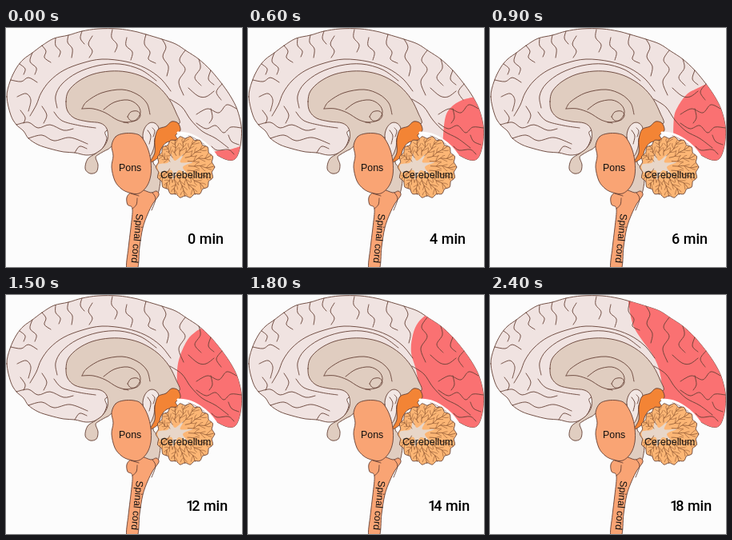
An HTML page for the animation above (2.7 s loop, 295 px wide and 299 px high).

```html
<!DOCTYPE html>
<html lang="en">
<head>
<meta charset="utf-8">
<title>Spreading wave across the cortex</title>
<style>
html, body { margin: 0; width: 100%; height: 100%; overflow: hidden; background: #fcfcfc; }
svg { display: block; width: 295px; height: 299px; }
path { stroke-linecap: round; stroke-linejoin: round; }
text { font: 12.4px "Liberation Sans", Arial, sans-serif; fill: #111; }
#time { font: 500 18px Roboto, sans-serif; fill: #000; }
</style>
</head>
<body>
<svg viewBox="0 0 295 299">
  <defs><clipPath id="clip"></clipPath></defs>
  <g id="base"></g>
  <path id="wave" fill="#fa7172" clip-path="url(#clip)"/>
  <g id="lines"></g>
  <text x="141" y="179">Pons</text>
  <text x="193" y="188">Cerebellum</text>
  <text transform="translate(163 232) rotate(96)">Spinal cord</text>
  <text id="time" y="270"><tspan id="tens"></tspan><tspan id="rest"></tspan></text>
</svg>
<script>
const $ = id => document.getElementById(id);
const INK = '#654035', TAN = '#e0cdc0', ORANGE = '#f9a474';

// Smooth curve through "x,y x,y ..." points
function smooth(text, closed) {
  const p = text.trim().split(/\s+/).map(s => s.split(',').map(Number)), n = p.length;
  const at = i => closed ? p[(i + n) % n] : p[Math.max(0, Math.min(n - 1, i))];
  let d = 'M' + p[0];
  for (let i = 0; i < (closed ? n : n - 1); i++) {
    const [a, b, c, e] = [at(i - 1), at(i), at(i + 1), at(i + 2)];
    const h = k => b[k] + (c[k] - a[k]) / 6, g = k => c[k] - (e[k] - b[k]) / 6;
    d += `C${h(0)},${h(1)} ${g(0)},${g(1)} ${c}`;
  }
  return d + (closed ? 'Z' : '');
}

function add(parent, d, fill = 'none', stroke = INK, width = 0.9) {
  const el = document.createElementNS('http://www.w3.org/2000/svg', 'path');
  Object.entries({ d, fill, stroke, 'stroke-width': width }).forEach(a => el.setAttribute(...a));
  $(parent).append(el);
}
const shape = (text, fill, stroke) => add('lines', smooth(text, true), fill, stroke);
const strokes = (text, color, width) =>
  text.trim().split('\n').forEach(s => add('lines', smooth(s), 'none', color, width));

const cortex = smooth(`1,86 5,67 13,50 22,39 33,31 45,22 60,13 78,9 95,4 115,1 140,1 160,4
  175,8 195,14 212,20 226,29 241,39 256,53 270,70 281,86 289,102 294,122 294,140 291,155
  286,164 277,165 264,159 254,150 243,142 230,135 215,130 170,128 127,128 126,139 121,150
  112,157 100,159 86,156 72,155 55,151 40,146 28,138 22,129 13,121 6,109`, true);
add('base', cortex, '#f0e3e1');
add('clip', cortex);

// Sulci
strokes(`45,22 50,29 48,37 56,43
  62,13 62,22 68,29 66,36
  78,9 77,18 83,26 82,37
  95,4 93,13 98,20
  108,10 103,20 108,29 104,37
  133,2 132,12 139,21 136,30
  151,12 150,22 158,30 156,40
  175,8 173,20 180,30 178,39 187,44
  195,14 200,24 196,36 203,48 201,60
  224,28 217,40 224,52 216,67 222,84
  241,39 243,50 236,62 244,72
  33,31 30,42 38,50 36,58
  17,45 24,51 22,58
  6,65 19,67 28,62 39,68
  14,86 25,82 31,90 28,104`);
strokes(`30,110 38,96 44,81 55,66 72,53 95,44 120,39 150,42 174,50 193,63 206,79
  64,100 62,85 70,70 89,56 115,47 142,45 168,52 188,66
  13,121 28,118 40,125 55,121 72,128 84,126
  28,138 45,134 60,141 80,137 102,145
  60,105 70,116 92,122 112,125
  45,98 51,109 47,119
  86,156 92,148 101,151
  18,103 24,112 22,119`);
strokes(`288,101 276,96 266,106 252,101 238,108
  294,125 281,124 272,131 262,122 250,126 238,119
  228,75 240,85 250,86 260,79
  205,89 220,99 231,115 245,129 262,138 278,150
  256,53 253,64 260,71
  270,70 263,80 269,90
  291,146 282,142 278,134
  256,101 258,112 254,119
  285,158 278,152 264,153 257,148`);

// Inner brain and pituitary
shape(`75,92 78,79 90,67 108,58 130,54 151,55 171,61 190,73 204,89 213,107 217,119 205,122
  191,130 188,151 184,168 193,181 190,207 181,210 166,200 146,178 135,150 127,152 116,158
  112,162 115,171 113,180 105,182 99,176 102,164 112,157 121,150 127,139 126,126 118,119
  102,117 86,113 77,104`, TAN);
strokes(`95,101 101,92 120,81 145,77 164,83 176,94 180,108
  95,101 109,101 124,106 139,115 153,119
  122,102 135,93 152,90 164,96 168,106 161,116 147,118
  152,111 156,105 164,104 168,109 164,115 156,116 152,111`);
shape('171,137 173,126 179,119 186,119 191,126 186,138 185,149 180,160 175,151', '#f2e7e4');
strokes(`177,128 181,135 179,145
  183,125 186,129 184,136`);
shape(`180,168 186,156 186,140 190,127 200,123 207,117 215,119 218,128 212,134 214,140
  201,143 194,151 190,162`, '#f38435');
strokes('215,131 229,133 243,140 254,149 262,159', '#fff', 3);

// Brainstem
shape(`151,302 153,275 156,250 158,226 152,221 151,212 156,206 168,202 181,206 188,204
  191,209 184,219 177,233 171,250 167,274 164,302`, ORANGE);
shape(`137,136 147,132 160,132 169,136 177,150 181,167 181,184 176,198 166,207 154,206
  144,201 136,191 132,174 134,160 132,147`, ORANGE);
strokes(`156,207 166,210
  158,226 163,221 164,213
  183,206 187,214 182,228`);

// Cerebellum: scalloped rim, pale core, branching folds
const polar = (a, r) => [224 + 36 * r * Math.cos(a), 174 + 38 * r * Math.sin(a)];
const rim = [];
for (let i = 0; i < 72; i++) {
  const a = i * Math.PI / 36;
  rim.push(polar(a, 0.98 + 0.04 * Math.cos(a * 18)).join());
}
shape(rim.join(' '), '#fcb675');
shape(`190,171 203,168 206,157 211,166 222,158 218,168 233,168 221,174 229,185 216,178
  209,190 207,178 193,181`, '#e8d6c8', 'none');
const from = [212, 171];
for (let i = 0; i < 15; i++) {
  const a = -2.72 + i * 0.39, end = polar(a, 0.97);
  const along = (k, side) => {
    const w = side + Math.sin(k * 17 + i) * 1.2;
    return [from[0] + (end[0] - from[0]) * k - Math.sin(a) * w,
            from[1] + (end[1] - from[1]) * k + Math.cos(a) * w];
  };
  add('lines', smooth([0.35, 0.5, 0.65, 0.82, 1].map(k => along(k, 0).join()).join(' ')),
    'none', '#885331', 0.8);
  for (const k of [0.5, 0.66, 0.82])
    for (const side of [-4, 4])
      add('lines', smooth(`${along(k, 0)} ${along(k + 0.06, side * 0.6)} ${along(k + 0.13, side)}`),
        'none', '#9b6039', 0.7);
}

// Wave front from bottom to top, and minutes shown, per step
const fronts = [
  '260,155 268,153 280,152 296,147',
  '252,150 258,132 272,120 296,112',
  '243,150 246,115 253,100 268,90 286,86',
  '229,140 230,112 235,98 246,83 258,76 275,68',
  '220,135 220,104 226,82 238,63 264,48',
  '214,135 214,95 218,75 227,56 237,46 250,38',
  '215,135 211,98 204,72 206,50 213,34 226,22',
  '216,135 213,96 204,72 196,51 194,35 200,12',
  '216,135 213,100 204,76 189,55 178,35 172,2'
];
const minutes = [0, 2, 4, 6, 10, 12, 14, 16, 18];
let shown = -1;

function show(step) {
  const front = fronts[step], x = front.split(',')[0], y = front.split(',').pop();
  $('wave').setAttribute('d', smooth(front) + `L300,${y - 5} 300,170 ${x},170Z`);
  const m = minutes[step], ten = m > 9;
  $('tens').textContent = ten ? '1' : '';
  $('rest').textContent = m % 10 + ' min';
  $('rest').setAttribute('dx', ten ? -3 : 0);
  $('time').setAttribute('x', ten ? 225 : 227);
}

function tick() {
  const step = Math.floor(performance.now() % 2700 / 300);
  if (step !== shown) show(shown = step);
  requestAnimationFrame(tick);
}
tick();
</script>
</body>
</html>
```
